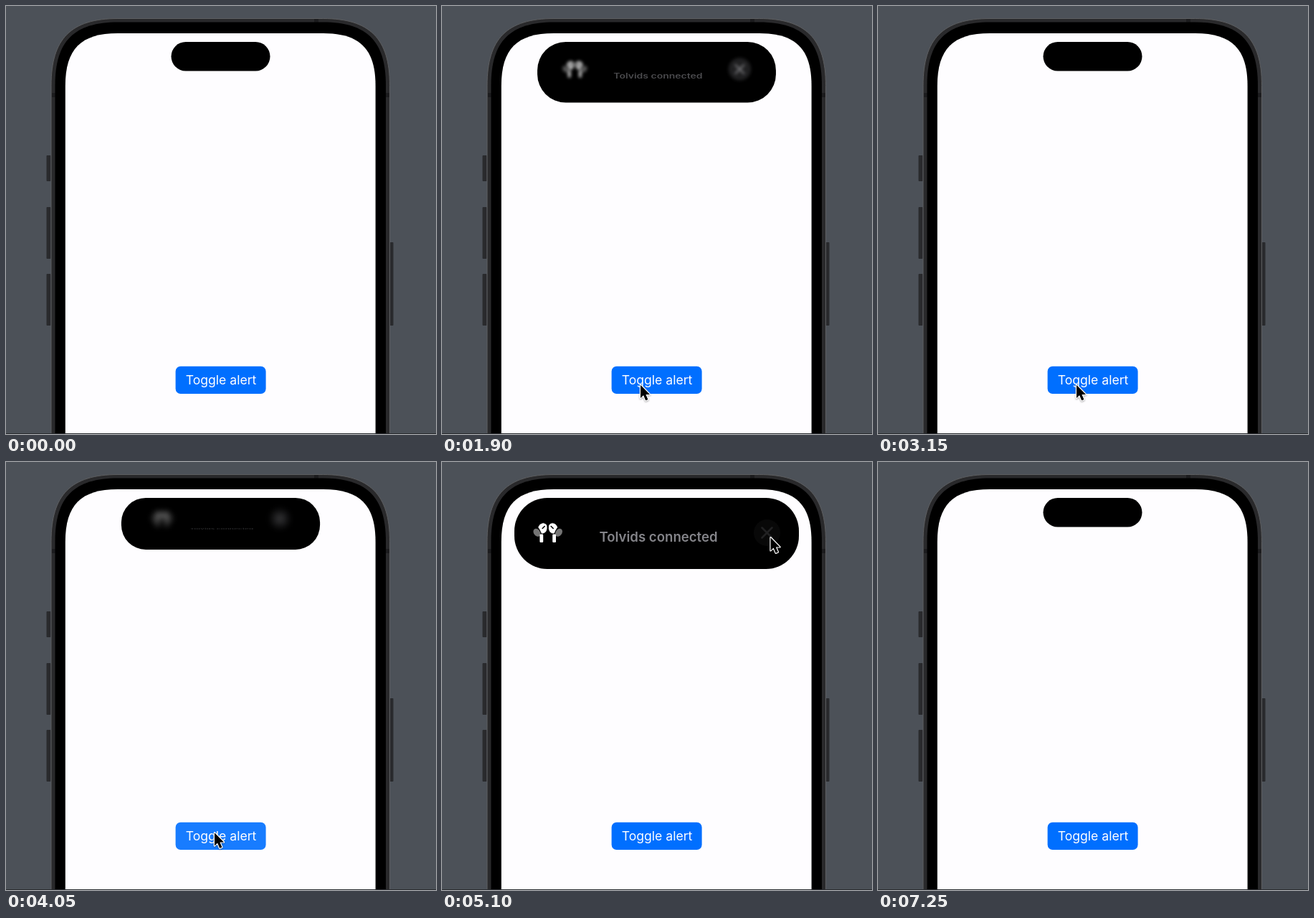
Animation, 600 px wide and 596 px high, one loop 7300 ms. Source, as an HTML page:

```html
<!DOCTYPE html>
<html lang="en">
<head>
<meta charset="utf-8">
<title>Island alert</title>
<style>
  html, body { margin: 0; width: 100%; height: 100%; overflow: hidden; background: #4c5158; }
  svg { display: block; width: 600px; height: 596px; }
  text { font-family: Inter, "Liberation Sans", sans-serif; text-anchor: middle; }
  #cursor { filter: drop-shadow(0 1px 1.2px rgba(0, 0, 0, .35)); }
</style>
</head>
<body>
<svg viewBox="0 0 600 596">
  <defs>
    <g id="bud">
      <ellipse cx="-15.3" cy=".3" rx="4.4" ry="6" fill="#747474" transform="rotate(-35 -15.3 .3)"/>
      <path d="M-14-7C-12-12-8-14-5-13C-1-12 0-8-1-4C-2 0-5 2-8 2C-10 2-10-2-14-7Z" fill="#fff" stroke="#000"/>
      <rect x="-11.3" y="2.5" width="4.8" height="11.5" rx="1.2" fill="#fff"/>
      <path d="M-7.5-5.5L-4.5-8.5" stroke="#000" stroke-width="1.6" stroke-linecap="round"/>
    </g>
  </defs>
  <g fill="#292a2d">
    <rect x="56.5" y="208" width="6" height="36" rx="1"/>
    <rect x="56.5" y="280" width="6" height="72" rx="1"/>
    <rect x="56.5" y="373" width="6" height="72" rx="1"/>
    <rect x="535.5" y="329" width="5" height="116" rx="1"/>
  </g>
  <path id="body" fill="#29292b" stroke="#5d5e60"/>
  <path d="M64 124H69M530 124H535M433 18V23" stroke="#1c1c1e" stroke-width="6"/>
  <path id="bezel"/>
  <path id="screen" fill="#fefdff"/>

  <rect id="island" y="50"/>
  <g id="icons">
    <g id="buds">
      <use href="#bud"/>
      <use href="#bud" transform="scale(-1 1)"/>
    </g>
    <g id="close">
      <circle r="18.5" fill="#2a2a2c"/>
      <path d="M-7-7L7 7M7-7L-7 7" stroke="#a5a5aa" stroke-width="2.5" stroke-linecap="round"/>
    </g>
  </g>
  <text id="label" y="6.5" font-size="18.6" font-weight="600" fill="#848489">Tolvids connected</text>

  <g id="button">
    <rect x="236.6" y="501.8" width="126" height="38.2" rx="7" fill="#006fff"/>
    <text x="300" y="527.3" font-size="17.6" fill="#fff">Toggle alert</text>
  </g>
  <path d="M0 595.5H600" stroke="#292b2f"/>
  <path id="cursor" d="M0 0V18.2L4.1 14.3L7.2 21.6L10.4 20.2L7.4 13.2H13Z"
        stroke="#fff" stroke-width="2.4" paint-order="stroke" stroke-linejoin="round"/>
</svg>
<script>
const LOOP = 7300, MID = 299.5;
const $ = id => document.getElementById(id);
const clamp = v => Math.max(0, Math.min(1, v));
const mix = (a, b, p) => a + (b - a) * p;
const span = (t, start, length) => clamp((t - start) / length);
const smooth = u => u * u * (3 - 2 * u);
const easeOut = u => 1 - (1 - u) ** 2;

// Continuous-corner outline running off the bottom of the stage
function outline(left, right, top, size) {
  const k = size * .3;
  return `M${left} 610V${top + size}C${left} ${top + k} ${left + k} ${top} ${left + size} ${top}` +
    `H${right - size}C${right - k} ${top} ${right} ${top + k} ${right} ${top + size}V610Z`;
}
$('body').setAttribute('d', outline(63, 535.5, 17.5, 93));
$('bezel').setAttribute('d', outline(68.5, 530, 22.5, 88));
$('screen').setAttribute('d', outline(82.8, 515.6, 38, 73));

// Moves: start, length, x, y, vertical bend
const START = [-18, 597];
const MOVES = [
  [250, 850, 276.5, 527, 2],
  [3250, 400, 290.5, 515.5, 1],
  [4530, 470, 458, 104.5, 1],
  [5330, 570, -22, 505, 1.3]
];
function cursorAt(t) {
  let [x, y] = START;
  for (const [start, length, toX, toY, bend] of MOVES) {
    const p = smooth(span(t, start, length));
    x = mix(x, toX, p);
    y = mix(y, toY, p ** bend);
  }
  return [x, y];
}

// Time, length and direction of each island change
const CHANGES = [[1700, 400, 1], [2820, 300, 0], [3923, 400, 1], [5150, 300, 0]];
const openness = t => CHANGES.reduce(
  (p, [start, length, to]) => mix(p, to, easeOut(span(t, start, length))), 0);

const press = (t, down, up) => span(t, down, 40) * (1 - span(t, up, 200));

function place(id, x, y, sx, sy = sx) {
  $(id).setAttribute('transform', `translate(${x} ${y}) scale(${sx} ${sy})`);
}

function draw(t) {
  const p = openness(t), width = mix(138, 397, p);
  const attrs = { x: MID - width / 2, width, height: mix(40.5, 99, p), rx: mix(20.3, 46, p) };
  for (const name in attrs) $('island').setAttribute(name, attrs[name]);

  const scale = mix(.4, 1, p);
  place('buds', MID - 151.8 * p, mix(56, 98, p), scale);
  place('close', MID + 154 * p, mix(56, 98.5, p), scale);
  place('label', mix(MID, 302, p), mix(80, 104, p), p, clamp(2 * p - 1) * .96 + .04);
  $('icons').style.opacity = p;
  $('icons').style.filter = p > .99 ? 'none' : `blur(${9 * (1 - p)}px)`;
  $('label').style.opacity = p * p;
  $('close').style.opacity = 1 - .8 * press(t, 5040, 5150);

  const pressed = press(t, 1580, 1680) + press(t, 2740, 2800) + press(t, 3820, 3930);
  $('button').style.opacity = 1 - .25 * pressed;

  const [x, y] = cursorAt(t);
  place('cursor', x + .5, y + .7, 1);
}

function frame(now) {
  draw(now % LOOP);
  requestAnimationFrame(frame);
}
requestAnimationFrame(frame);
</script>
</body>
</html>
```
